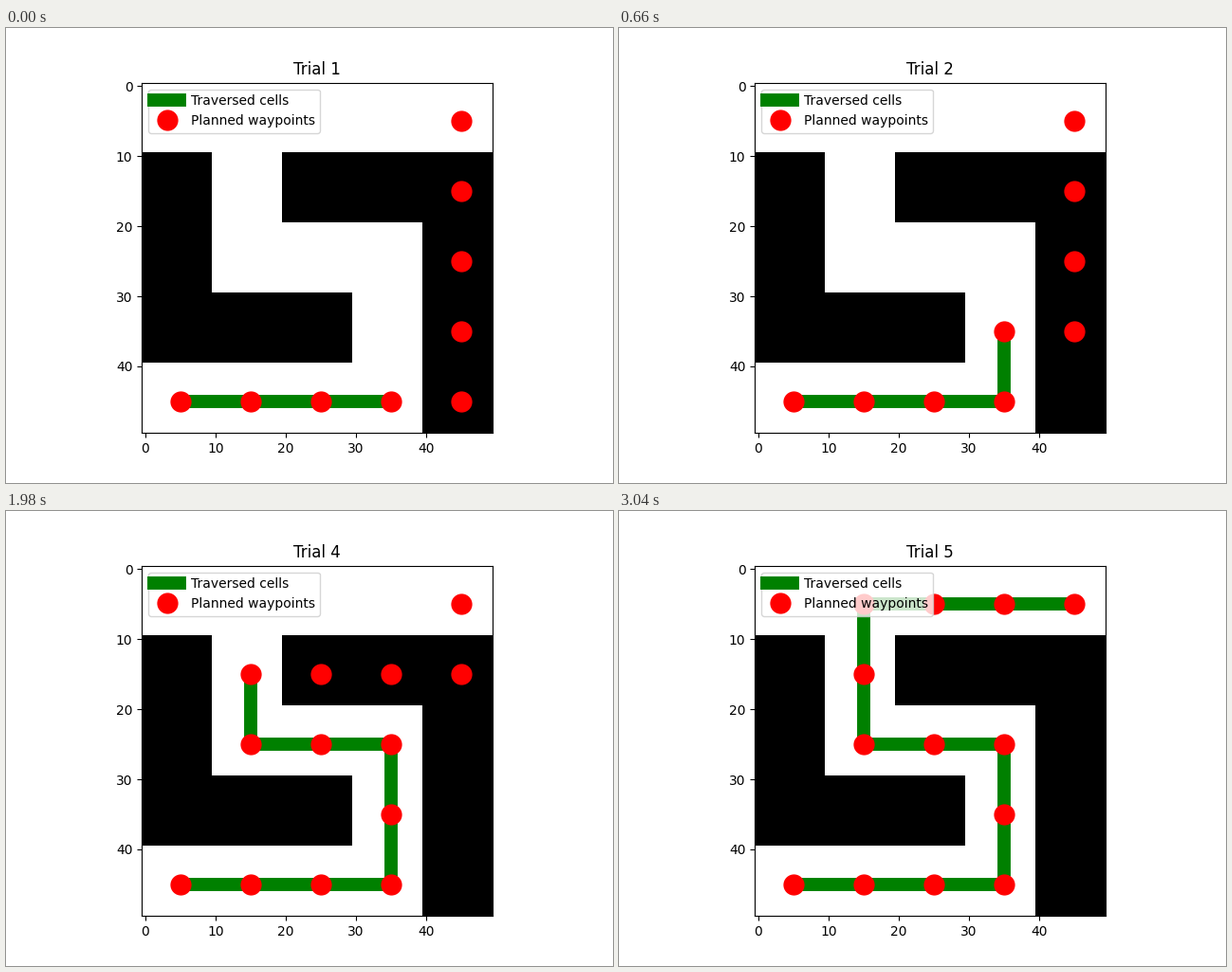
These frames come from a looping animation (640 px wide and 480 px high, 3300 ms). A matplotlib script:

```python
import numpy as np
import matplotlib.pyplot as plt
from matplotlib.animation import FuncAnimation

CELL = 10
GOAL = (4, 0)
WALLS = ["00000",
         "10111",
         "10001",
         "11101",
         "00001"]
# Corners of the route in cells (column, row)
CORNERS = [(0, 4), (3, 4), (3, 2), (1, 2), (1, 0), GOAL]
REACHED = [4, 5, 6, 9, 13]  # cells traversed after each trial


def walk(corners):
    """List every cell along straight legs between corners."""
    cells = [corners[0]]
    for end in corners[1:]:
        while cells[-1] != end:
            x, y = cells[-1]
            cells.append((x + int(np.sign(end[0] - x)),
                          y + int(np.sign(end[1] - y))))
    return cells


def centres(cells):
    return (np.array(cells) * CELL + CELL // 2).T


ROUTE = walk(CORNERS)

fig, ax = plt.subplots(figsize=(6.4, 4.8), dpi=100)
grid = np.array([[int(c) for c in row] for row in WALLS])
ax.imshow(np.kron(grid, np.ones((CELL, CELL))), cmap="gray_r", vmin=0, vmax=1)
ax.set(xlim=(-0.5, 49.5), ylim=(49.5, -0.5))
trail, = ax.plot([], [], color="green", lw=10, label="Traversed cells")
points, = ax.plot([], [], "o", color="red", ms=15, label="Planned waypoints")
ax.legend(loc="upper left")
title = ax.set_title("Trial 1")


def update(i):
    done = ROUTE[:REACHED[i]]
    # The plan assumes open ground: straight across, then up to the goal
    plan = walk([done[-1], (GOAL[0], done[-1][1]), GOAL])
    trail.set_data(*centres(done))
    points.set_data(*centres(done + plan[1:]))
    title.set_text(f"Trial {i + 1}")
    return trail, points, title


anim = FuncAnimation(fig, update, frames=len(REACHED), interval=660,
                     repeat=True, repeat_delay=0)
plt.show()
```
